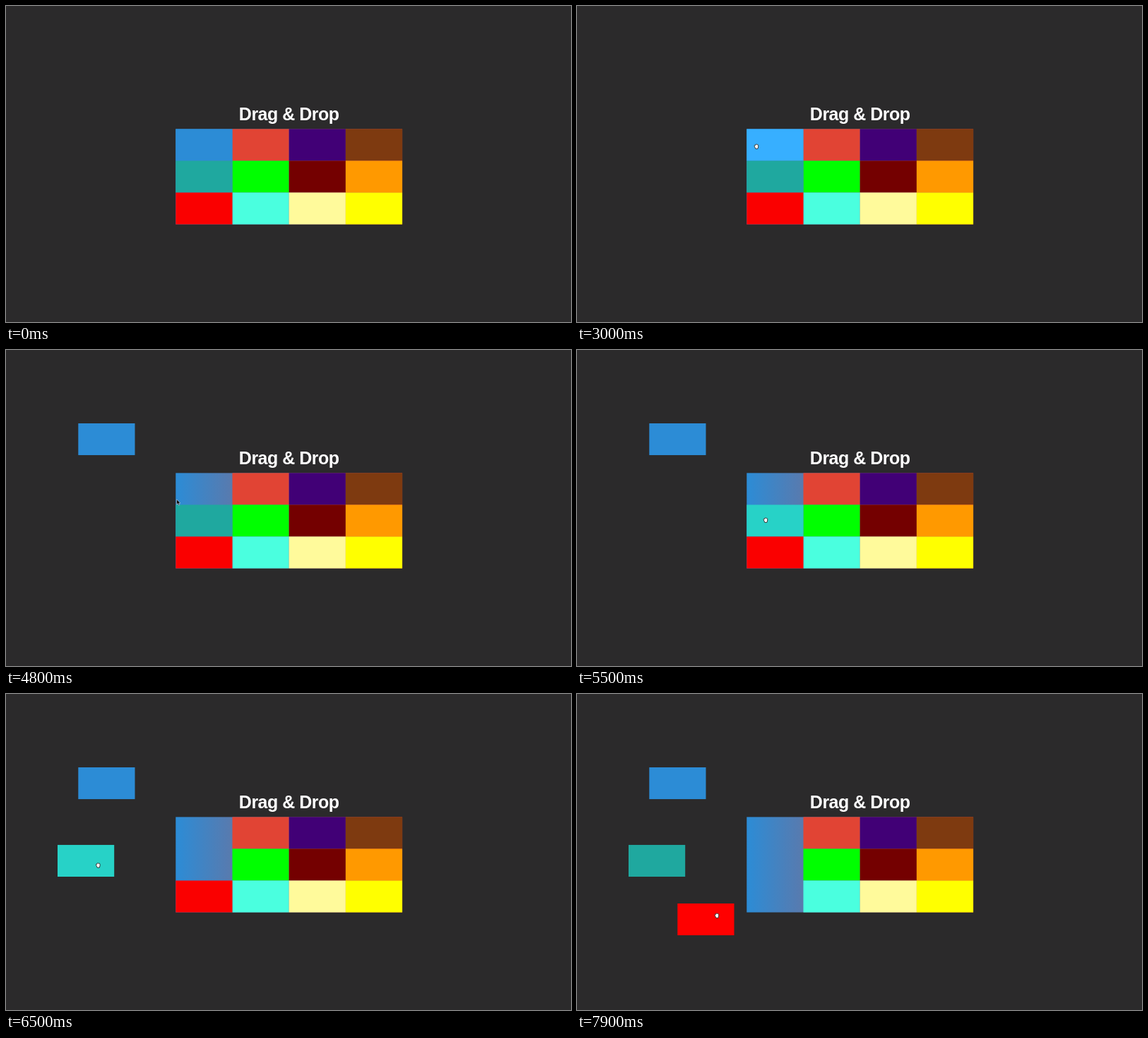
Animation of 800x448 px, one loop 8 s. Source, as an HTML page:

```html
<!DOCTYPE html>
<html lang="en">
<head>
<meta charset="utf-8">
<title>Drag &amp; Drop</title>
<style>
  html, body { margin: 0; width: 100%; height: 100%; overflow: hidden; background: #2b2a2b; }
  svg { display: block; width: 100vw; height: 100vh; }
  text { font: bold 25px "Liberation Sans", Arial, sans-serif; letter-spacing: -.02em; fill: #fff; }
</style>
</head>
<body>
<svg viewBox="0 0 800 448">
  <defs>
    <linearGradient id="tray">
      <stop offset="0" stop-color="#2c8cd6"/>
      <stop offset="1" stop-color="#e14434"/>
    </linearGradient>
  </defs>
  <text x="400.7" y="162.4" text-anchor="middle">Drag &amp; Drop</text>
  <rect id="back" fill="url(#tray)"/>
  <g id="cells"></g>
  <g id="cursor">
    <path id="arrow" d="M0 0V7.2L1.7 5.6L2.9 8.2L4.2 7.6L3.1 5.1H5.2Z" fill="#000" stroke="#ddd" stroke-width=".6"/>
    <path id="hand" d="M-2.9 -.6C-3 -1.6 -2 -1.8 -1.7 -1.2C-1.9 -3 -.5 -3.3 -.1 -2.4C.4 -3.4 1.3 -3 1.4 -2.2C2.2 -2.8 2.9 -2 2.7 -1V.9C2.6 2 2 2.4 1.9 3.4H-1.2C-1.4 2 -2.6 1.2 -2.9 -.6Z" fill="#fff" stroke="#222" stroke-width=".9"/>
  </g>
</svg>
<script>
const LOOP = 8000, STEP = 100, APPEAR = 800;
const LEFT = 240.3, TOP = 174.4, W = 80.2, H = 45.05, COLS = 4;
const COLORS = [
  "#2c8cd6", "#e14434", "#410076", "#7e3a10",
  "#1fa89f", "#00ff00", "#740000", "#ff9900",
  "#fa0000", "#4affdf", "#fffa9b", "#ffff00"
];
const [BLUE, TEAL, RED] = [0, 4, 8];

const smooth = u => u * u * (3 - 2 * u);
const easeOut = u => 1 - (1 - u) ** 2;

// Each move takes the pointer on to a point, bowed by "bend"; a held cell goes with it.
const entry = { x: 334, y: 360 };
const moves = [
  { start: 800, end: 900, x: 341, y: 348 },
  { start: 1600, end: 1800, x: 288, y: 348 },
  { start: 2000, end: 3000, x: 254, y: 199, bend: [-112, 0] },
  { start: 3300, end: 3900, x: 225, y: 126.6, cell: BLUE },
  { start: 4000, end: 4500, x: 116, y: 128.6, cell: BLUE },
  { start: 4600, end: 4900, x: 267, y: 241, bend: [19, 0] },
  { start: 4900, end: 5500, x: 267, y: 241, bend: [25, 8] },
  { start: 5500, end: 6400, x: 99.7, y: 235.5, cell: TEAL, bend: [0, 3], ease: easeOut },
  { start: 6400, end: 6800, x: 296, y: 281.5 },
  { start: 7000, end: 7400, x: 296, y: 281.5, bend: [6, -5] },
  { start: 7400, end: 7900, x: 198, y: 314, cell: RED, bend: [0, -10] }
];

const byId = id => document.getElementById(id);
const setAttrs = (el, attrs) => {
  for (const key in attrs) el.setAttribute(key, attrs[key]);
};

function brighten(hex) {
  const channel = i => Math.min(255, Math.round(parseInt(hex.slice(i, i + 2), 16) * 1.25));
  return `rgb(${channel(1)},${channel(3)},${channel(5)})`;
}

setAttrs(byId("back"), { x: LEFT, y: TOP, width: W * COLS, height: H * 3 });

const cells = COLORS.map((color, i) => {
  const el = document.createElementNS("http://www.w3.org/2000/svg", "rect");
  setAttrs(el, { width: W, height: H });
  return { el, color, x: LEFT + W * (i % COLS), y: TOP + H * Math.floor(i / COLS),
           loose: moves.some(m => m.cell === i) };
});
// Loose cells come last so that they pass over the others.
[...cells].sort((a, b) => a.loose - b.loose).forEach(c => byId("cells").append(c.el));

function poseAt(t) {
  let pointer = entry;
  const shifts = COLORS.map(() => ({ x: 0, y: 0 }));
  for (const { start, end, x, y, cell, bend = [0, 0], ease = smooth } of moves) {
    if (t <= start) break;
    const k = ease(Math.min(1, (t - start) / (end - start)));
    const bow = Math.sin(Math.PI * k);
    const dx = (x - pointer.x) * k + bend[0] * bow;
    const dy = (y - pointer.y) * k + bend[1] * bow;
    pointer = { x: pointer.x + dx, y: pointer.y + dy };
    if (cell !== undefined) {
      shifts[cell].x += dx;
      shifts[cell].y += dy;
    }
  }
  return { pointer, shifts };
}

function render(t) {
  const { pointer, shifts } = poseAt(t), shown = t >= APPEAR;
  let over = false;
  cells.forEach((cell, i) => {
    const x = cell.x + shifts[i].x, y = cell.y + shifts[i].y;
    const hit = shown && pointer.x >= x && pointer.x < x + W && pointer.y >= y && pointer.y < y + H;
    over = over || hit;
    setAttrs(cell.el, { x, y, fill: hit ? brighten(cell.color) : cell.color });
  });
  setAttrs(byId("cursor"), {
    transform: `translate(${pointer.x} ${pointer.y})`,
    visibility: shown ? "visible" : "hidden"
  });
  byId("hand").style.display = over ? "" : "none";
  byId("arrow").style.display = over ? "none" : "";
}

const begin = performance.now();
function tick() {
  const t = Math.max(0, performance.now() - begin) % LOOP;
  render(Math.floor(t / STEP) * STEP);
  requestAnimationFrame(tick);
}
tick();
</script>
</body>
</html>
```
